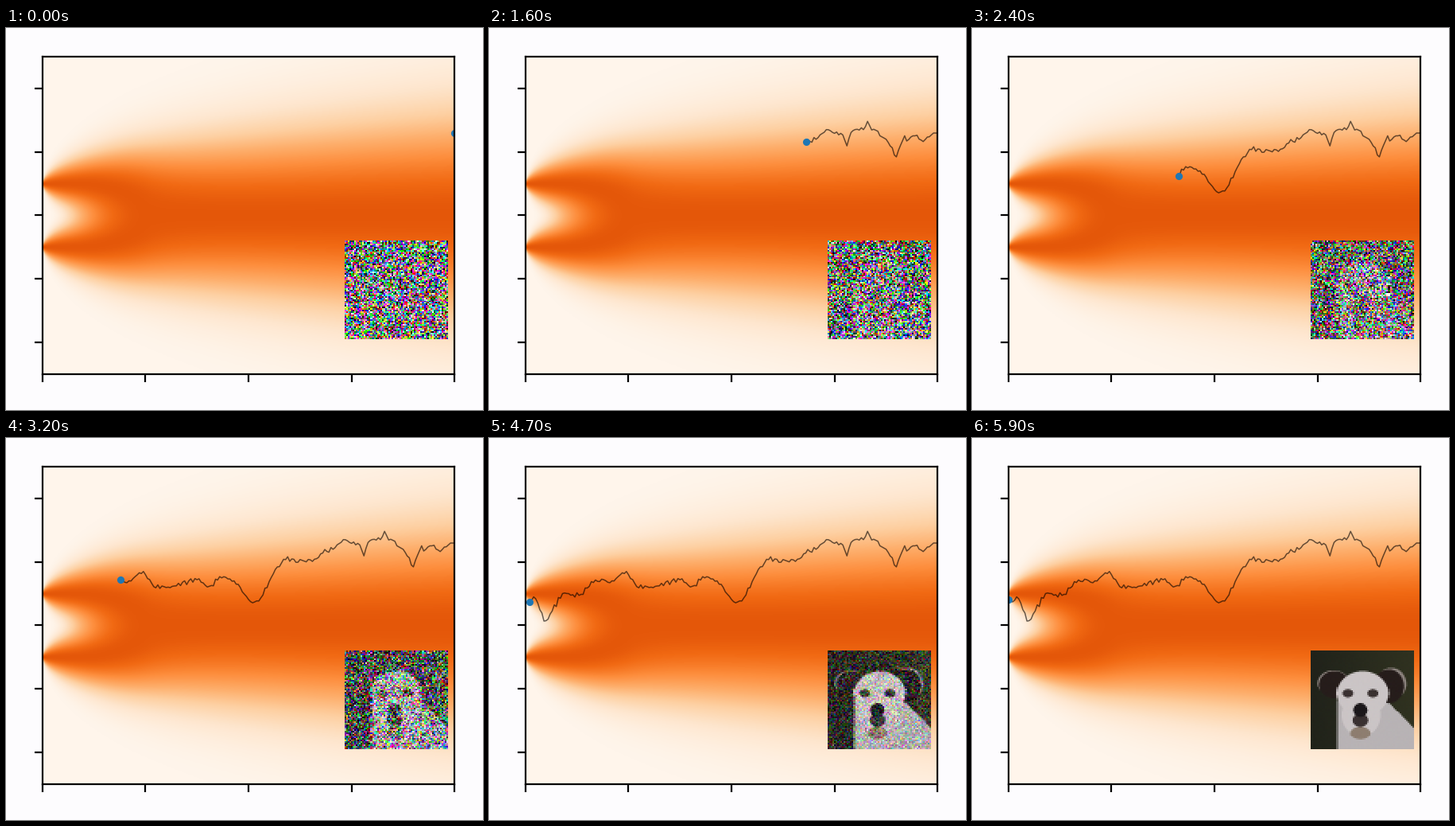
A matplotlib script for the animation above (6 s loop, 600 by 480 pixels).

```python
import numpy as np
import matplotlib.pyplot as plt
from matplotlib.animation import FuncAnimation

FRAMES, INTERVAL, DPI = 60, 100, 200
LEFT, RIGHT, TOP, BOTTOM = 45.8, 564.3, 36, 434.7   # plot box in stage pixels
BOX = (425.5, 555.5, 391, 267)                      # inset: left, right, bottom, top
CELLS, FINE = 64, 4

# Main turns of the random path, in stage pixels
TURNS = np.array([
    (45, 204), (59, 202), (70, 232), (92, 196), (116, 198), (133, 178),
    (157, 181), (171, 166), (186, 187), (212, 186), (241, 176), (252, 190),
    (268, 175), (291, 182), (307, 206), (320, 203), (338, 166), (351, 152),
    (386, 153), (402, 144), (426, 128), (446, 135), (450, 149), (455, 131),
    (477, 122), (502, 141), (512, 163), (519, 142), (536, 135), (547, 144),
    (556, 132), (565, 132),
])


def density():
    """Two point masses spreading by diffusion, each column scaled to its peak."""
    t = np.linspace(0, 1, 520)[None, :] + 0.0008
    y = np.linspace(2.5, -2.5, 400)[:, None]
    p = sum(np.exp(-(y - m) ** 2 / (2 * t)) for m in (-0.5, 0.5))
    return 0.69 * p / p.max(axis=0)


def random_path():
    """Small seeded steps around the main turns."""
    x = np.linspace(LEFT, RIGHT, 201)
    jitter = np.random.default_rng(4).normal(0, 1.7, x.size)
    jitter[-3:] = 0
    return x, np.interp(x, *TURNS.T) + jitter


def dog_picture():
    """Flat-shape dog portrait on a dark ground, as CELLS x CELLS RGB."""
    n = CELLS * FINE
    x, y = np.meshgrid(np.linspace(BOX[0], BOX[1], n), np.linspace(BOX[3], BOX[2], n))
    shade = ((x - BOX[0]) / 130)[..., None]
    img = np.array([32, 34, 26]) + shade * np.array([16, 16, 6])
    coat, rim, ear, dark = (203, 197, 198), (140, 131, 126), (38, 29, 27), (58, 49, 49)

    def oval(color, cx, cy, rx, ry):
        img[((x - cx) / rx) ** 2 + ((y - cy) / ry) ** 2 < 1] = color

    # body, then ears: a dark oval over a light one leaves a thin rim
    img[(x > 459) & (y > 330) & (y > 330 + (x - 521))] = (184, 179, 181)
    oval(rim, 454, 308, 20, 16)
    oval(ear, 455, 310, 19, 17)
    oval(rim, 527, 309, 19, 20)
    oval(ear, 524, 312, 19, 21)
    # head
    oval(coat, 491, 321, 33, 28)
    oval(coat, 489, 348, 25, 27)
    for eye in (472, 504):
        oval(dark, eye, 321, 7, 5)
    oval((142, 126, 112), 488, 371, 13, 8)
    oval(dark, 488, 355, 10, 8)
    oval((28, 24, 27), 488, 342, 9, 9)
    return img.reshape(CELLS, FINE, CELLS, FINE, 3).mean(axis=(1, 3)) / 255


dog = dog_picture()
path_x, path_y = random_path()


def spread(i):
    """Noise level, easing from 1 to 0 over the loop."""
    return np.cos(np.pi / 2 * (i + 0.45) / FRAMES) ** 2


def inset(i):
    level = spread(i)
    noise = np.random.default_rng(i).standard_normal(dog.shape)
    mix = 0.47 + (dog - 0.47) * (1 - level)
    return np.clip(mix + 0.55 * level ** 0.65 * noise, 0, 1)


def trail(i):
    head = LEFT + (RIGHT - LEFT) * spread(i) ** 2
    past = path_x > head
    return (np.append(head, path_x[past]),
            np.append(np.interp(head, path_x, path_y), path_y[past]))


fig = plt.figure(figsize=(600 / DPI, 480 / DPI), dpi=DPI, facecolor="#fdfcfe")
ax = fig.add_axes([LEFT / 600, 1 - BOTTOM / 480,
                   (RIGHT - LEFT) / 600, (BOTTOM - TOP) / 480])
ax.imshow(density(), cmap="Oranges", vmin=0, vmax=1, aspect="auto",
          extent=(LEFT, RIGHT, BOTTOM, TOP), interpolation="bilinear")
photo = ax.imshow(inset(0), extent=BOX, aspect="auto",
                  interpolation="nearest", zorder=3)
line, = ax.plot([], [], color="black", alpha=0.6, lw=0.55)
dot, = ax.plot([], [], "o", color="#1f77b4", ms=3.3, mew=0)
middle, unit = (TOP + BOTTOM) / 2, (BOTTOM - TOP) / 5
ax.set(xlim=(LEFT, RIGHT), ylim=(BOTTOM, TOP),
       xticks=np.linspace(LEFT, RIGHT, 5), yticks=middle + unit * np.arange(-2, 3))
ax.tick_params(labelbottom=False, labelleft=False, width=0.8, length=3.5)


def update(i):
    x, y = trail(i)
    line.set_data(x, y)
    dot.set_data(x[:1], y[:1])
    photo.set_data(inset(i))
    return line, dot, photo


anim = FuncAnimation(fig, update, frames=FRAMES, interval=INTERVAL,
                     repeat=True, repeat_delay=0)
plt.show()
```
